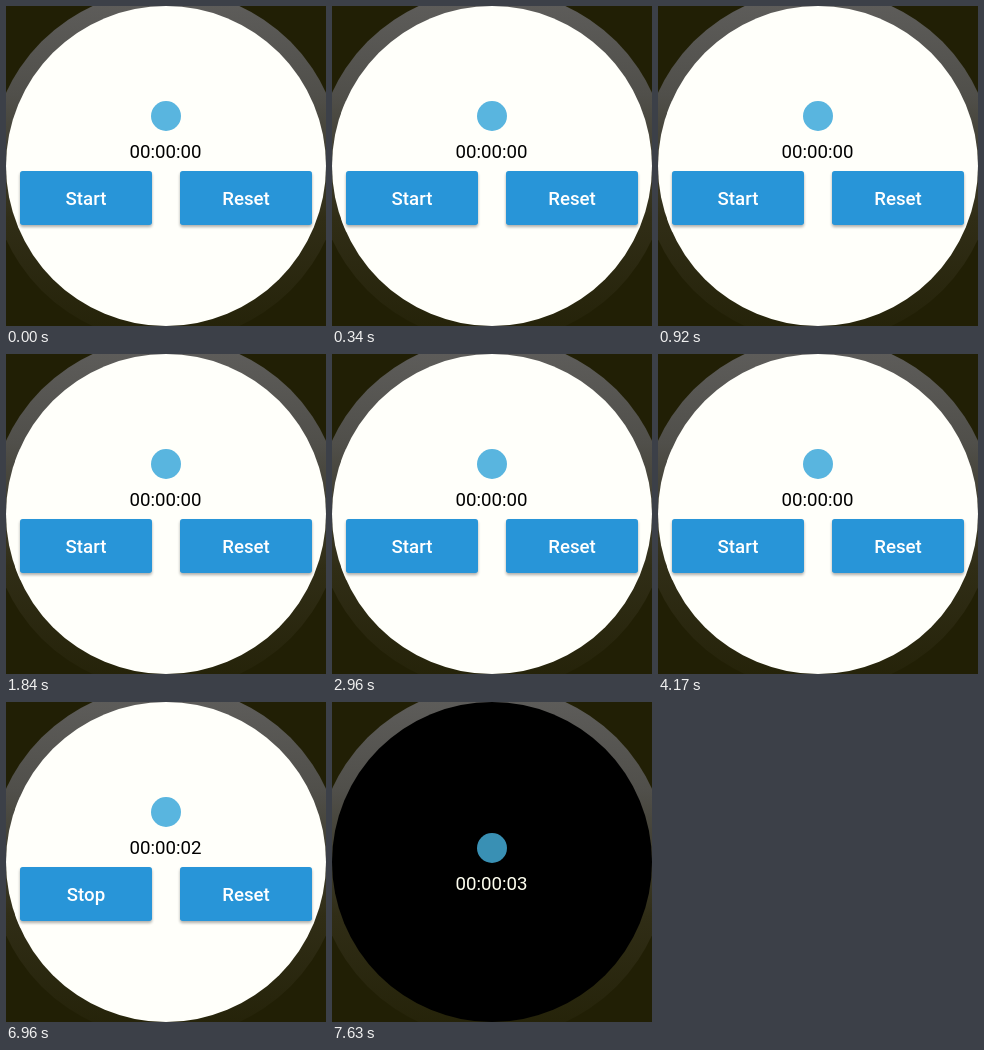
These frames come from a looping animation (320 px wide and 320 px high, 8 s). An HTML page:

```html
<!DOCTYPE html>
<html lang="en">
<head>
<meta charset="utf-8">
<title>Watch stopwatch</title>
<style>
  html, body { margin: 0; width: 100%; height: 100%; overflow: hidden; background: #211f05; }
  svg { display: block; width: 320px; height: 320px; }
  text { font: 18.67px Roboto, sans-serif; text-anchor: middle; }
  .label { font-weight: 500; fill: #fff; }
  .button { fill: #2895d8; }
  .shadow { filter: blur(1.6px); fill: #000; opacity: .32; }
</style>
</head>
<body>
<svg viewBox="0 0 320 320">
  <defs>
    <linearGradient id="rim" x1="0" y1="0" x2="0" y2="1">
      <stop offset="0" stop-color="#5f5e5c"/>
      <stop offset=".3" stop-color="#504f4a"/>
      <stop offset=".65" stop-color="#302d16"/>
      <stop offset="1" stop-color="#242208"/>
    </linearGradient>
    <clipPath id="startArea"><rect x="14" y="165" width="132" height="54" rx="2.7"/></clipPath>
  </defs>
  <rect width="320" height="320" fill="#211f05"/>
  <circle cx="160" cy="160" r="176" fill="url(#rim)"/>
  <circle id="face" cx="160" cy="160" r="160"/>
  <circle id="logo" cx="160" r="15"/>
  <text id="timer" x="159.5"></text>
  <g id="controls">
    <rect id="lift" class="shadow" x="14" y="167" width="132" height="54" rx="2.7"/>
    <rect class="shadow" x="174" y="167" width="132" height="54" rx="2.7"/>
    <rect class="button" x="14" y="165" width="132" height="54" rx="2.7"/>
    <rect class="button" x="174" y="165" width="132" height="54" rx="2.7"/>
    <circle id="ripple" cx="80" cy="192" fill="#fff" clip-path="url(#startArea)"/>
    <text id="toggle" class="label" x="80" y="199"></text>
    <text class="label" x="240" y="199">Reset</text>
  </g>
</svg>
<script>
  const LOOP = 8000, PRESS = 3960, RELEASE = 4170, AMBIENT = 7590;
  const $ = id => document.getElementById(id);
  const set = (id, attrs) => {
    for (const name in attrs) $(id).setAttribute(name, attrs[name]);
  };

  function draw(t) {
    const dark = t >= AMBIENT;
    const seconds = dark ? 3 : Math.max(0, Math.floor((t - PRESS) / 1000) - 1);
    set('face', { fill: dark ? '#000' : '#fffffa' });
    set('logo', { cy: dark ? 146 : 110, fill: dark ? '#3990b4' : '#59b5df' });
    set('timer', { y: dark ? 188 : 152, fill: dark ? '#fffff0' : '#000' });
    set('controls', { visibility: dark ? 'hidden' : 'visible' });
    $('timer').textContent = '00:00:0' + seconds;
    $('toggle').textContent = seconds ? 'Stop' : 'Start';

    // The splash spreads while the raised button settles back.
    const p = (t - PRESS) / (RELEASE - PRESS);
    const pressed = p >= 0 && p < 1;
    set('ripple', { r: pressed ? 20 + 60 * p : 0, opacity: pressed ? .24 * (1 - p) : 0 });
    set('lift', { y: pressed ? 167 + 2 * Math.sin(Math.PI * p) : 167 });
  }

  function tick() {
    draw(performance.now() % LOOP);
    requestAnimationFrame(tick);
  }
  tick();
</script>
</body>
</html>
```
